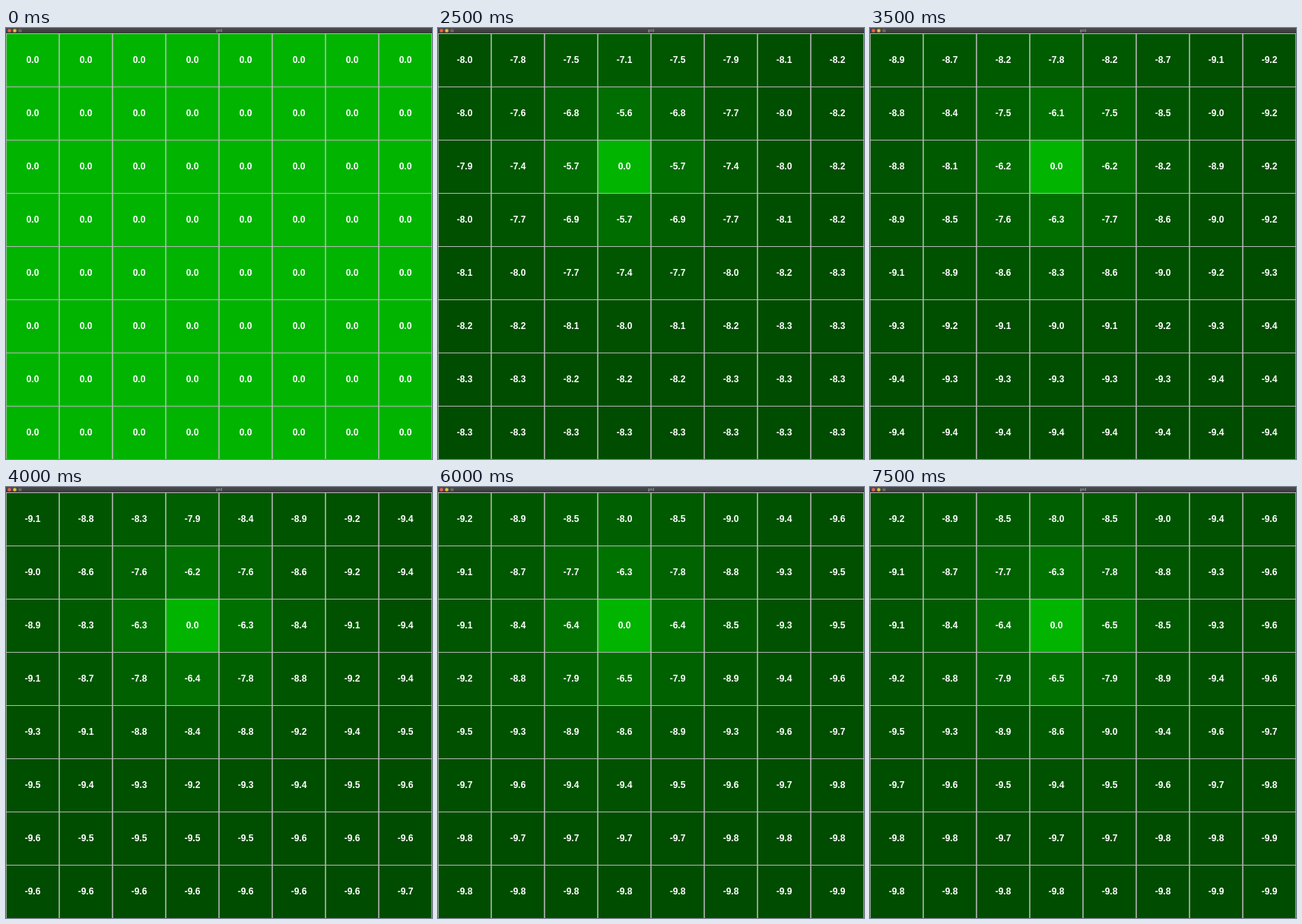
An HTML page for the animation above (8000 ms loop, 560x567 px).

```html
<!DOCTYPE html>
<html lang="en">
<head>
<meta charset="utf-8">
<title>grid</title>
<style>
  html, body { margin: 0; width: 100%; height: 100%; overflow: hidden; background: #004c00; }
  svg { display: block; width: 560px; height: 567px; }
  text { font-family: "Liberation Sans", Arial, sans-serif; text-anchor: middle; }
  .value { font-size: 12px; font-weight: bold; fill: #fff; }
  .title { font-size: 5px; fill: #b4b4b4; }
</style>
</head>
<body>
<svg id="stage" viewBox="0 0 560 567" xmlns="http://www.w3.org/2000/svg">
  <defs>
    <linearGradient id="bar" x1="0" y1="0" x2="0" y2="1">
      <stop offset="0" stop-color="#4b4b4d"/>
      <stop offset="1" stop-color="#39393b"/>
    </linearGradient>
  </defs>
</svg>
<script>
const SIZE = 8, CELL = 70, TOP = 7;
const GOAL = { row: 2, col: 3 };
const GAMMA = 0.9, REWARD = -1;
const LOOP = 8000, HOLD = 1500, STEP = 500;
const BRIGHT = 180, DARK = 76;

const stage = document.getElementById("stage");

function add(tag, attrs, text = "") {
  const node = document.createElementNS(stage.namespaceURI, tag);
  for (const name in attrs) node.setAttribute(name, attrs[name]);
  node.textContent = text;
  stage.appendChild(node);
  return node;
}

const clamp = i => Math.min(SIZE - 1, Math.max(0, i));

// One synchronous sweep of a random walk; walls bounce back into the same cell.
function sweep(values) {
  const at = (row, col) => values[clamp(row) * SIZE + clamp(col)];
  return values.map((_, i) => {
    const row = Math.floor(i / SIZE), col = i % SIZE;
    if (row === GOAL.row && col === GOAL.col) return 0;
    const sum = at(row - 1, col) + at(row + 1, col) + at(row, col - 1) + at(row, col + 1);
    return REWARD + GAMMA * sum / 4;
  });
}

// About eleven sweeps per second, shown every half second.
const sweepsAt = k => k === 0 ? 0 : Math.floor(5.5 * k) + 1;

const states = [];
let values = new Array(SIZE * SIZE).fill(0);
for (let k = 0, done = 0; k <= (LOOP - HOLD) / STEP; k++) {
  for (; done < sweepsAt(k); done++) values = sweep(values);
  states.push(values);
}

const cells = values.map((_, i) => {
  const x = (i % SIZE) * CELL, y = TOP + Math.floor(i / SIZE) * CELL;
  return {
    box: add("rect", { x, y, width: CELL, height: CELL, "shape-rendering": "crispEdges" }),
    label: add("text", { class: "value", x: x + 35, y: y + 39.2 })
  };
});

for (let i = 0; i <= SIZE; i++) {
  add("rect", { x: i * CELL - 0.75, y: TOP, width: 1.5, height: 560, fill: "#bcbcbc" });
  add("rect", { x: 0, y: TOP + i * CELL, width: 560, height: 1, fill: "#b0b8b0" });
}

add("rect", { x: 0, y: 0, width: 560, height: TOP, fill: "url(#bar)" });
["#f25e52", "#f2bc30", "#69696b"].forEach((fill, i) =>
  add("circle", { cx: 4.5 + i * 7, cy: 3.5, r: 2.3, fill }));
add("text", { class: "title", x: 280, y: 5 }, "grid");

let shown = -1;

function draw(time) {
  const t = time % LOOP;
  const k = t < HOLD ? 0 : Math.floor((t - HOLD) / STEP) + 1;
  if (k === shown) return;
  shown = k;
  const state = states[k];
  const low = Math.min(...state) || -1;
  state.forEach((value, i) => {
    const green = Math.round(BRIGHT + (DARK - BRIGHT) * Math.abs(value / low));
    cells[i].box.setAttribute("fill", `rgb(0,${green},0)`);
    cells[i].label.textContent = value.toFixed(1);
  });
}

const start = performance.now();
function tick() {
  draw(performance.now() - start);
  requestAnimationFrame(tick);
}
tick();
</script>
</body>
</html>
```
